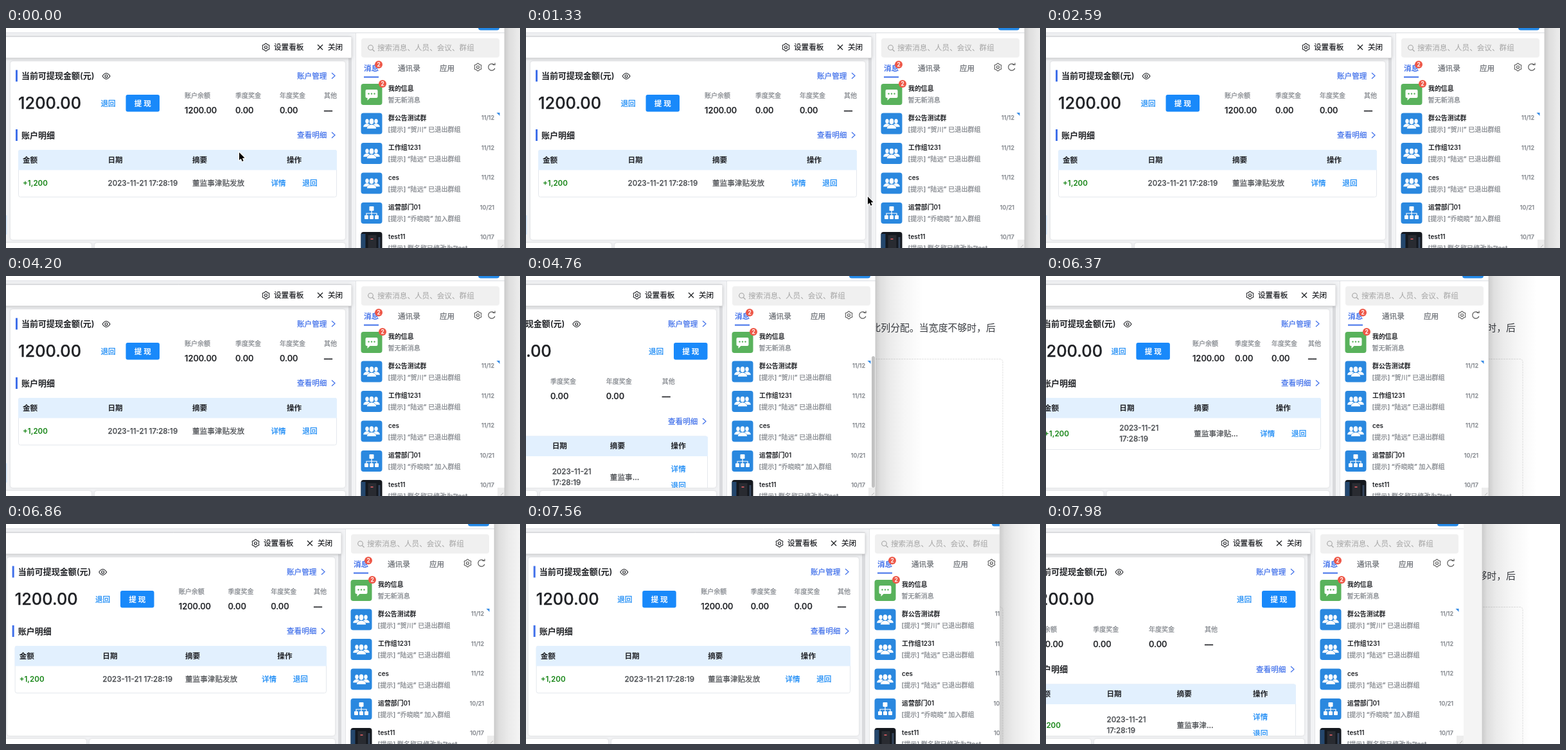
An HTML page with a canvas for the animation above (8000 ms loop, 800x343 px).

```html
<!DOCTYPE html>
<html lang="zh-CN">
<head>
<meta charset="utf-8">
<title>看板</title>
<style>
html, body { margin: 0; width: 100%; height: 100%; overflow: hidden; background: #fff; }
canvas { display: block; width: 800px; height: 343px; }
</style>
</head>
<body>
<canvas id="stage"></canvas>
<script>
const W = 800, H = 343, LOOP = 8000, STEP = 70;
const BLUE = '#4070ea', LINK = '#1688f5', INK = '#202226', GRAY = '#83878d';
const FONT = 'Inter, "Noto Sans CJK SC", "Noto Sans CJK", sans-serif';
const canvas = document.getElementById('stage');
const g = canvas.getContext('2d');
const scale = window.devicePixelRatio || 1;
canvas.width = W * scale;
canvas.height = H * scale;

// Right edge of the window, as an offset from its widest place
const widthKeys = [[4200, 0], [4690, -232], [4760, -232], [5810, -284], [5880, -294], [5950, -297],
  [6300, -87], [6370, -87], [6790, -16], [6860, -16], [7200, -2], [7490, -10],
  [7770, -180], [7910, -126], [7980, -97], [8050, -80]];
const pointerKeys = [[70, 363, 194], [280, 420, 215], [1050, 420, 215], [1400, 560, 275],
  [1540, 560, 275], [1890, 690, 320], [2100, 690, 320], [2450, 778, 352]];

// Smooth curve through the keys that rests at turns and pauses
function shiftAt(t) {
  const k = widthKeys, n = k.length - 1;
  if (t <= k[0][0]) return 0;
  let i = 0;
  while (i < n - 1 && t >= k[i + 1][0]) i++;
  const rate = j => (k[j + 1][1] - k[j][1]) / (k[j + 1][0] - k[j][0]);
  const slope = j => {
    if (j === 0 || j === n) return 0;
    const a = rate(j - 1), b = rate(j);
    return a * b <= 0 ? 0 : 2 * a * b / (a + b);
  };
  const [t0, a] = k[i], [t1, b] = k[i + 1], span = t1 - t0, u = (t - t0) / span;
  return a + (b - a) * u * u * (3 - 2 * u)
    + span * u * (1 - u) * (slope(i) * (1 - u) - slope(i + 1) * u);
}

function font(size, weight = 500) { g.font = `${weight} ${size}px ${FONT}`; }
function text(s, x, y, size, color = INK, weight = 500, align = 'left') {
  font(size, weight);
  g.fillStyle = g.strokeStyle = color;
  g.textAlign = align;
  g.fillText(s, x, y + size * 0.37);
  if (weight === 500) {
    g.lineWidth = 0.25;
    g.strokeText(s, x, y + size * 0.37);
  }
}
function box(x, y, w, h, color, r = 0) {
  g.fillStyle = color;
  g.beginPath();
  g.roundRect(x, y, w, h, r);
  g.fill();
}
function disc(x, y, r, color) {
  g.fillStyle = color;
  g.beginPath();
  g.arc(x, y, r, 0, 7);
  g.fill();
}
function ring(x, y, r, from = 0, to = 7) {
  g.beginPath();
  g.arc(x, y, r, from, to);
  g.stroke();
}
function line(color, width, ...p) {
  g.strokeStyle = color;
  g.lineWidth = width;
  g.beginPath();
  for (let i = 0; i < p.length; i += 2) g.lineTo(p[i], p[i + 1]);
  g.stroke();
}
function shape(color, ...p) {
  g.fillStyle = color;
  g.beginPath();
  for (let i = 0; i < p.length; i += 2) g.lineTo(p[i], p[i + 1]);
  g.closePath();
  g.fill();
}
function clip(x, y, w, h, draw) {
  g.save();
  g.beginPath();
  g.rect(x, y, w, h);
  g.clip();
  draw();
  g.restore();
}
function fit(s, width, size) {
  font(size);
  if (g.measureText(s).width <= width) return s;
  while (s && g.measureText(s + '...').width > width) s = s.slice(0, -1);
  return s + '...';
}

function gear(x, y, color) {
  g.strokeStyle = color;
  g.lineWidth = 1.1;
  g.beginPath();
  for (let i = 0; i < 48; i++) {
    const a = i * Math.PI / 24, r = 5.3 + 0.6 * Math.cos(6 * a);
    g.lineTo(x + r * Math.sin(a), y + r * Math.cos(a));
  }
  g.closePath();
  g.stroke();
  ring(x, y, 2);
}
function eye(x, y) {
  g.strokeStyle = INK;
  g.lineWidth = 1.1;
  g.beginPath();
  g.moveTo(x - 6, y);
  g.quadraticCurveTo(x, y - 9, x + 6, y);
  g.quadraticCurveTo(x, y + 9, x - 6, y);
  g.stroke();
  ring(x, y, 2);
}
function badge(x, y) {
  disc(x, y, 6, '#ee5747');
  text('2', x, y, 8.5, '#fff', 500, 'center');
}
function pointer(x, y) {
  g.save();
  g.translate(x, y);
  g.beginPath();
  [[0, 0], [0, 12], [2.7, 9.6], [4.6, 14], [6.6, 13], [4.8, 8.9], [8.5, 8.6]].forEach(p => g.lineTo(...p));
  g.closePath();
  g.strokeStyle = '#fff';
  g.lineWidth = 2;
  g.stroke();
  g.fillStyle = '#000';
  g.fill();
  g.restore();
}

function person(x, y, k) {
  g.fillStyle = '#fff';
  g.strokeStyle = '#2a88df';
  g.lineWidth = 1;
  for (const pass of ['stroke', 'fill']) {
    g.beginPath();
    g.ellipse(x, y - 3 * k, 3 * k, 4 * k, 0, 0, 7);
    g[pass]();
    g.beginPath();
    g.ellipse(x, y + 7 * k, 6.5 * k, 5.5 * k, 0, Math.PI, 0);
    g.closePath();
    g[pass]();
  }
}
const icons = {
  note(x, y) {
    box(x, y, 33, 33, '#59b25c', 4);
    box(x + 7, y + 9, 19, 13, '#fff', 2);
    shape('#fff', x + 10, y + 21, x + 10, y + 26, x + 15, y + 21);
    for (const i of [-1, 0, 1]) disc(x + 16.5 + i * 4.5, y + 15.5, 1.2, '#59b25c');
  },
  group(x, y) {
    box(x, y, 33, 33, '#2a88df', 4);
    person(x + 9.5, y + 15.5, 0.9);
    person(x + 23.5, y + 15.5, 0.9);
    person(x + 16.5, y + 16.5, 1.1);
  },
  tree(x, y) {
    box(x, y, 33, 33, '#2a88df', 4);
    line('#fff', 1.2, x + 16.5, y + 11, x + 16.5, y + 21);
    line('#fff', 1.2, x + 8.5, y + 21, x + 8.5, y + 17, x + 24.5, y + 17, x + 24.5, y + 21);
    box(x + 13, y + 6, 7, 7, '#fff', 1);
    for (const i of [-1, 0, 1]) box(x + 13.5 + i * 8, y + 20, 6, 6, '#fff', 1);
  },
  photo(x, y) {
    box(x, y, 33, 33, '#15191f', 4);
    box(x, y + 3, 7, 30, '#24476d');
    box(x + 11, y + 5, 13, 28, '#292b31');
    box(x + 15, y + 10, 4, 2, '#c0555a');
    box(x + 27, y + 8, 3, 25, '#35455c');
  }
};
const chats = [
  ['note', 87, '我的信息', '暂无新消息', ''],
  ['group', 132.5, '群公告测试群', '[提示] “贺川” 已退出群组', '11/12'],
  ['group', 179, '工作组1231', '[提示] “陆远” 已退出群组', '11/12'],
  ['group', 225.5, 'ces', '[提示] “陆远” 已退出群组', '11/12'],
  ['tree', 272, '运营部门01', '[提示] “乔晓晓” 加入群组', '10/21'],
  ['photo', 318, 'test11', '[提示] 群名称已修改为“test...', '10/17']
];

function page(edge) {
  g.setLineDash([3, 1]);
  line('#e2e2e2', 1, 300, 129.5, 739, 129.5, 742, 132, 742, H);
  g.setLineDash([]);
  text('flex: 1 按比列分配。当宽度不够时，后', 731, 80.5, 14.9, '#3a3d42', 400, 'right');
  const shade = g.createLinearGradient(edge, 0, edge + 75, 0);
  [[0, 0.2], [0.1, 0.13], [0.3, 0.08], [0.6, 0.035], [1, 0]]
    .forEach(([p, a]) => shade.addColorStop(p, `rgba(0,0,0,${a})`));
  g.fillStyle = shade;
  g.fillRect(edge, 0, 75, H);
}

function heading(s, x, y, more, moreX) {
  box(x - 9, y - 9, 3, 18, BLUE);
  text(s, x, y, 13, INK, 600);
  text(more, moreX, y, 11.6, BLUE);
  line(BLUE, 1.2, moreX + 54, y - 4.5, moreX + 59, y, moreX + 54, y + 4.5);
}

function account(c) {
  const s = c / 3, narrow = c < -110, wrapped = c < -45, dy = narrow ? 59.5 : 0;
  heading('当前可提现金额(元)', 24 + s, 74.5, '账户管理', 453 + c);
  eye(156 + s, 75);
  text('1200.00', 19 + s, 117, 25.4);

  const bx = narrow ? 462 + c : 186.5 + c * 0.53;
  text('退回', bx - 39, 117.5, 11.6, LINK);
  box(bx, 104, 52.5, 26.5, '#1989fa', 3);
  text('提 现', bx + 26.3, 117.5, 11.6, '#fff', 600, 'center');

  [['账户余额', '1200.00', 278, 0.575, 19], ['季度奖金', '0.00', 357, 0.725, 115.3],
    ['年度奖金', '0.00', 426, 0.862, 202], ['其他', '––', 495, 1, 289]]
    .forEach(([name, value, x, rate, slim]) => {
      const left = narrow ? slim + s : x + c * rate;
      text(name, left, 105 + dy, 10, GRAY);
      text(value, left, 127.7 + dy, 13);
    });

  heading('账户明细', 24 + s, 167 + dy, '查看明细', 453 + c);
  const left = 19 + s, right = 515 + c, top = 190 + dy;
  const date = 158.5 + c * 0.508, memo = 290 + c * 0.686, act = 448.5 + c * 0.911;
  const rowH = narrow ? 66 : wrapped ? 49 : 42;
  const mid = narrow ? 313.5 : wrapped ? 245.5 : 242;
  g.strokeStyle = '#e4e8ed';
  g.lineWidth = 1;
  g.beginPath();
  g.roundRect(left + 0.5, top + 0.5, right - left - 1, 31 + rowH, 3);
  g.stroke();
  box(left, top, right - left, 31.5, '#e2f0fe', [3, 3, 0, 0]);
  text('金额', 26 + s, top + 15.7, 11.6, INK, 600);
  text('日期', date, top + 15.7, 11.6, INK, 600);
  text('摘要', memo, top + 15.7, 11.6, INK, 600);
  text('操作', act, top + 15.7, 11.6, INK, 600, 'center');

  text('+1,200', 26 + s, mid, 11.6, '#168516', 600);
  if (wrapped) {
    text('2023-11-21', date, mid - 8.7, 11.6, '#4c4f53');
    text('17:28:19', date, mid + 8.7, 11.6, '#4c4f53');
  } else text('2023-11-21 17:28:19', date, mid, 11.6, '#4c4f53');
  text(fit('董监事津贴发放', 85.5 + c * 0.136, 11.6), memo, mid, 11.6, '#4c4f53');
  const gapX = narrow ? 0 : 24.4, gapY = narrow ? 13 : 0;
  text('详情', act - gapX, mid - gapY, 11.6, LINK, 500, 'center');
  text('退回', act + gapX, mid + gapY, 11.6, LINK, 500, 'center');
}

function board(c) {
  const s = c / 3, right = 528 + c, split = 133 + c * 0.5;
  box(0, 8, 544 + c, H, '#f2f3f5');
  box(533 + c, 47, 5, H, '#d9dadd');
  box(s - 5, 292, 6.5, 30, '#cfe3f8');

  g.save();
  g.shadowColor = 'rgba(0,0,0,.25)';
  g.shadowBlur = 5 * scale;
  g.shadowOffsetY = scale;
  box(-20, 13.5, 557.5 + c, 33, '#fff', 2);
  g.restore();
  line('#d2d3d6', 1, 0, 13.5, 537.5 + c, 13.5);
  gear(404.5 + c, 30, INK);
  text('设置看板', 417 + c, 30, 11.6);
  line(INK, 1.2, 485 + c, 26, 493 + c, 34);
  line(INK, 1.2, 493 + c, 26, 485 + c, 34);
  text('关闭', 501 + c, 30, 11.6);

  g.save();
  g.shadowColor = 'rgba(0,0,0,.14)';
  g.shadowBlur = 3 * scale;
  box(7 + s, 52, right - 7 - s, 278, '#fff', 4);
  box(-20, 335, split + 20, 20, '#fff', 4);
  box(split + 5, 335, right - split - 5, 20, '#fff', 4);
  g.restore();
  clip(7 + s, 52, right - 7 - s, 278, () => account(c));
}

function messenger() {
  box(544, 8, 232, H, '#fff');
  line('#e3e4e6', 1, 544.5, 8, 544.5, H);
  box(553, 16, 215, 30, '#f0f0f0', 4);
  g.strokeStyle = '#a2a2a2';
  g.lineWidth = 1.1;
  ring(567.5, 30.5, 3.8);
  line('#a2a2a2', 1.1, 570.3, 33.3, 573.5, 36.5);
  text('搜索消息、人员、会议、群组', 578, 31, 11.6, '#a5a5a5', 400);

  text('消息', 557, 62.5, 11.6, BLUE, 600);
  text('通讯录', 610, 62.5, 11.6, '#6b6f75');
  text('应用', 675, 62.5, 11.6, '#6b6f75');
  box(557, 75.5, 23, 2, BLUE);
  badge(580, 57);
  gear(734.5, 61, '#555');
  g.strokeStyle = '#555';
  g.lineWidth = 1.2;
  ring(756, 61, 5.2, 0.35, 5.6);
  line('#555', 1.2, 757.5, 57.5, 761, 57.5, 761, 54.5);

  for (const [icon, y, name, note, day] of chats) {
    icons[icon](552.5, y);
    text(name, 595, y + 7.5, 9.9, INK, 600);
    text(note, 594.5, y + 25.5, 10.1, GRAY);
    text(day, 760, y + 7.5, 9, GRAY, 500, 'right');
  }
  badge(586, 87);
  shape('#398de5', 763.5, 132, 768.5, 132, 768.5, 137);
}

function draw(t) {
  // The contents follow the window edge one step late
  const c = shiftAt(t - STEP), edge = 776 + shiftAt(t), inner = 776 + c;
  g.setTransform(scale, 0, 0, scale, 0, 0);
  box(0, 0, W, H, '#fff');
  page(edge);
  clip(0, 0, edge, H, () => {
    box(0, 0, edge, H, '#f4f4f4');
    box(0, 0, inner, H, '#fff');
    board(c);
    g.save();
    g.translate(c, 0);
    messenger();
    box(735, -8, 33, 11.5, '#2387e5', 4);
    g.restore();
    line('#dadde2', 1, 0, 7.5, inner, 7.5);
    if (t >= 4620 && t < 4900) box(inner - 6, 125, 5, 205, '#c2c2c2', 2.5);
    box(inner - 11, 330, 11, 13, '#ededed');
    line('#b5b5b5', 1, inner - 6, 342, inner - 2, 338);
  });
  line('#c6c6c6', 0.7, edge, 0, edge, H);

  if (t < 2450) {
    const k = pointerKeys;
    let i = 0;
    while (i < k.length - 2 && t >= k[i + 1][0]) i++;
    const [t0, x0, y0] = k[i], [t1, x1, y1] = k[i + 1];
    const u = Math.max(0, (t - t0) / (t1 - t0));
    pointer(x0 + (x1 - x0) * u, y0 + (y1 - y0) * u);
  }
}

const start = performance.now();
function tick(now) {
  const t = Math.max(0, now - start) % LOOP;
  draw(Math.floor(t / STEP) * STEP);
  requestAnimationFrame(tick);
}
draw(0);
requestAnimationFrame(tick);
</script>
</body>
</html>
```
